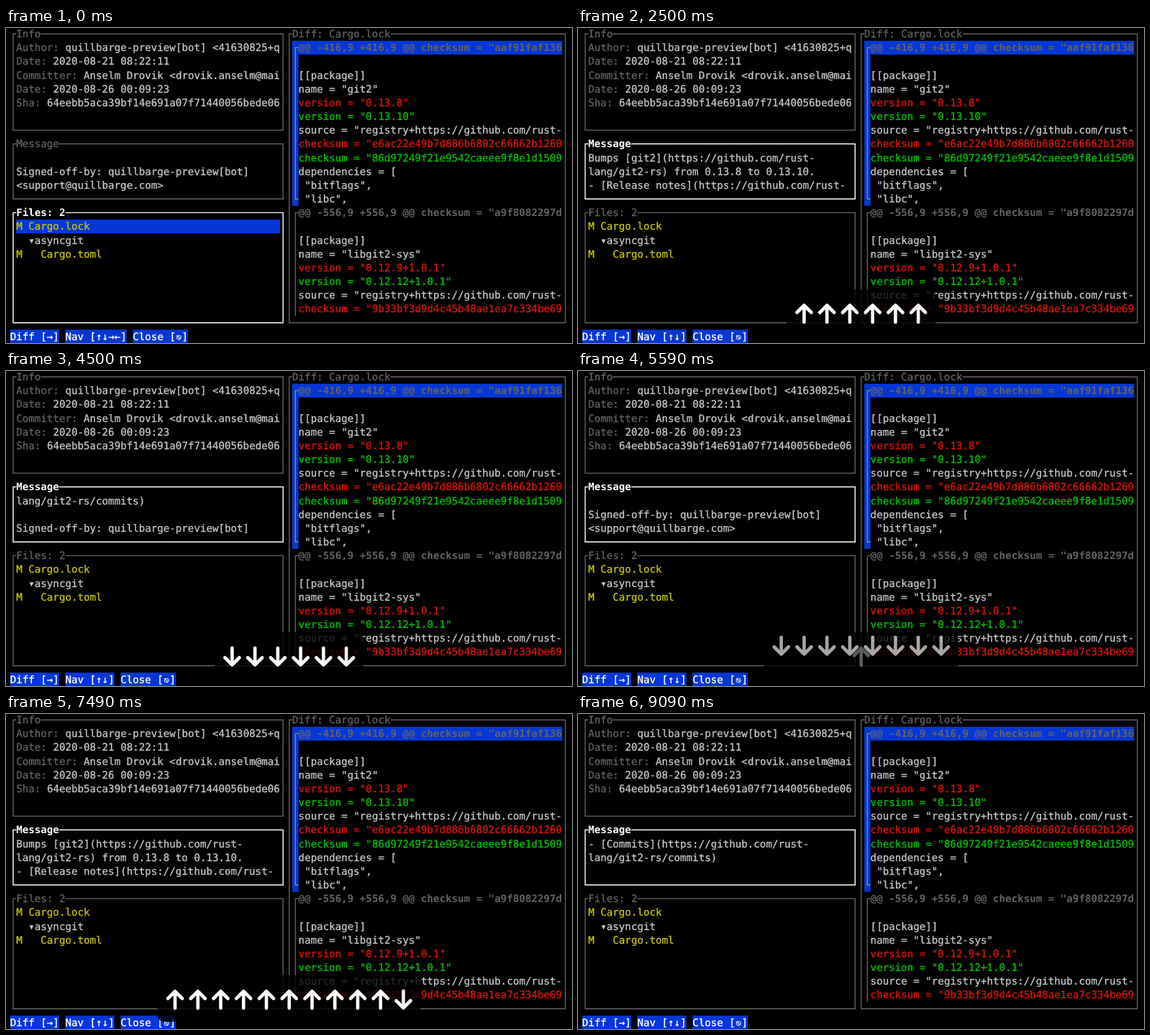
Write an HTML page that moves like this. It is 787 px wide and 439 px high and loops after 9190 ms.

```html
<!DOCTYPE html>
<html lang="en">
<head>
<meta charset="utf-8">
<title>Commit details</title>
<style>
html, body { margin: 0; width: 100%; height: 100%; overflow: hidden; background: #000; }
svg { display: block; width: 787px; height: 439px; }
text {
  font: 14.17px "DejaVu Sans Mono", monospace; white-space: pre;
  text-rendering: geometricPrecision;
  fill: currentColor; stroke: currentColor; stroke-width: .3;
}
.bold { font-weight: bold; stroke: none; }
</style>
</head>
<body>
<svg viewBox="0 0 787 439">
  <rect width="787" height="439"/>
  <g id="fixed"></g>
  <g id="live"></g>
  <g id="keys"></g>
</svg>
<script>
const LOOP = 9190, CELL = 8.53, ROW = 19.17;
const GREY = '#626262', LIGHT = '#c7c7c7', WHITE = '#fff', RED = '#dc1608',
      GREEN = '#00c400', YELLOW = '#c7c400', BLUE = '#0637d6';

const colX = c => 5.7 + c * CELL;
const rowY = r => 8.2 + r * ROW;
const escape = s => s.replace(/&/g, '&amp;').replace(/</g, '&lt;');

const text = (c, r, s, color = LIGHT, bold = false) =>
  `<text x="${colX(c)}" y="${rowY(r) + 4.8}" color="${color}"${bold ? ' class="bold"' : ''}>${escape(s)}</text>`;

const fillCells = (c, r, cols, rows = 1) =>
  `<rect x="${colX(c)}" y="${rowY(r) - ROW / 2}" width="${cols * CELL}" height="${rows * ROW}" fill="${BLUE}"/>`;

const line = (d, stroke) => `<path d="${d}" fill="none" stroke="${stroke}" stroke-width="1.4"/>`;

function panel(c1, r1, c2, r2, title, active) {
  const x1 = colX(c1 + .5), x2 = colX(c2 + .5), y1 = rowY(r1), y2 = rowY(r2);
  const color = active ? WHITE : GREY;
  return line(`M${colX(c1 + 1)} ${y1}H${x1}V${y2}H${x2}V${y1}H${colX(c1 + 1 + title.length)}`, color)
    + text(c1 + 1, r1, title, color, active);
}

// Diff lines start with -, + or a blank
function hunk(row, end, closed, header, lines) {
  const x = colX(46.5), edge = colX(47);
  const tail = closed ? `V${rowY(end)}H${edge}` : `V${rowY(end) + ROW / 2}`;
  const tint = { '-': RED, '+': GREEN, ' ': LIGHT };
  return line(`M${edge} ${rowY(row)}H${x}${tail}`, closed ? '#8a8a8a' : GREY)
    + text(47, row, header, GREY, true)
    + lines.map((s, i) => text(47, row + 1 + i, s.slice(1), tint[s[0]])).join('');
}

const info = [
  ['Author:', 'quillbarge-preview[bot] <41630825+q'],
  ['Date:', '2020-08-21 08:22:11'],
  ['Committer:', 'Anselm Drovik <drovik.anselm@mai'],
  ['Date:', '2020-08-26 00:09:23'],
  ['Sha:', '64eebb5aca39bf14e691a07f71440056bede06']
];

const message = [
  'Bumps [git2](https://github.com/rust-',
  'lang/git2-rs) from 0.13.8 to 0.13.10.',
  '- [Release notes](https://github.com/rust-',
  'lang/git2-rs/releases)',
  '- [Commits](https://github.com/rust-',
  'lang/git2-rs/commits)',
  '',
  'Signed-off-by: quillbarge-preview[bot]',
  '<support@quillbarge.com>'
];

const first = [
  ' ', ' [[package]]', ' name = "git2"', '-version = "0.13.8"', '+version = "0.13.10"',
  ' source = "registry+https://github.com/rust-',
  '-checksum = "e6ac22e49b7d886b6802c66662b1260',
  '+checksum = "86d97249f21e9542caeee9f8e1d1509',
  ' dependencies = [', '  "bitflags",', '  "libc",'
];

const second = [
  ' ', ' [[package]]', ' name = "libgit2-sys"', '-version = "0.12.9+1.0.1"', '+version = "0.12.12+1.0.1"',
  ' source = "registry+https://github.com/rust-',
  '-checksum = "9b33bf3d9d4c45b48ae1ea7c334be69'
];

// Runs of key presses: the first `ups` go up, the rest down
const runs = [
  { ups: 1, at: [700] },
  { ups: 8, at: [1400, 1800, 1900, 2000, 2100, 2400, 2700, 2800] },
  { ups: 0, at: [3700, 3900, 4000, 4200, 4300, 4400, 4590, 4790] },
  { ups: 10, at: [5590, 5990, 6190, 6290, 6490, 6690, 6790, 6990,
                  7090, 7290, 7390, 7590, 7690, 7790, 7990] }
];

const fixed = () =>
  panel(0, 0, 44, 7, 'Info', false)
  + info.map(([label, value], i) =>
      text(1, i + 1, label, GREY) + text(2 + label.length, i + 1, value)).join('')
  + panel(45, 0, 90, 21, 'Diff: Cargo.lock', false)
  + fillCells(46, 1, 44) + fillCells(46, 1, 1, 12)
  + hunk(1, 12, true, '@@ -416,9 +416,9 @@ checksum = "aaf91faf136', first)
  + hunk(13, 20, false, '@@ -556,9 +556,9 @@ checksum = "a9f8082297d', second);

function button(c, label) {
  return fillCells(c, 22, label.length) + text(c, 22, label, WHITE);
}

function live(inMessage, scroll) {
  const nav = inMessage ? 'Nav [↑↓]' : 'Nav [↑↓→←]';
  const close = 10 + nav.length;
  return panel(0, 8, 44, 12, 'Message', inMessage)
    + message.slice(scroll, scroll + 3).map((s, i) => text(1, 9 + i, s)).join('')
    + panel(0, 13, 44, 21, 'Files: 2', !inMessage)
    + (inMessage ? '' : fillCells(1, 14, 43))
    + text(1, 14, 'M Cargo.lock', YELLOW)
    + text(3, 15, '▾asyncgit')
    + text(1, 16, 'M   Cargo.toml', YELLOW)
    + button(0, 'Diff [→]') + button(9, nav) + button(close, 'Close [ ]')
    + `<text x="${colX(close + 7.5)}" y="${rowY(22) + 4.8}" color="${WHITE}" text-anchor="middle" style="font-size:12px">⎋</text>`;
}

function arrow(i, count, up, dy, opacity) {
  const x = 393.8 + (i - (count - 1) / 2) * 31.75;
  return `<path transform="translate(${x} ${398 + dy}) scale(1 ${up ? 1 : -1})" opacity="${opacity}"
    d="M0 12V-11M-10 -1.5L0 -11.5L10 -1.5" fill="none" stroke="#fff" stroke-width="4.6"
    stroke-linecap="round" stroke-linejoin="round"/>`;
}

function keys(t) {
  const index = runs.findLastIndex(run => run.at[0] <= t);
  if (index < 0 || t >= 9090) return '';
  const { ups, at } = runs[index], old = runs[index - 1];
  const count = at.filter(k => k <= t).length;
  const age = t - at[count - 1];
  const replacing = count === 1 && old && age < 90;
  const wide = replacing ? Math.max(count, old.at.length) : count;
  const half = wide * 15.875 + 8.2;
  const fresh = age < 90 ? (replacing ? .35 : .6) : age < 180 ? .95 : 1;
  let out = `<rect x="${393.5 - half}" y="364" width="${2 * half}" height="65" rx="9" opacity=".8"/>`;
  if (replacing) {
    old.at.forEach((k, i) => out += arrow(i, old.at.length, i < old.ups, -15, .65));
  }
  for (let i = 0; i < count; i++) {
    out += arrow(i, count, i < ups, 0, i === count - 1 ? fresh : 1);
  }
  const fade = t < 8890 ? 1 : t < 8990 ? .6 : .25;
  return `<g opacity="${fade}">${out}</g>`;
}

// The first press after a change of direction does not scroll
function scrollAt(t) {
  let pos = 6, last = 1;
  for (const { ups, at } of runs) at.forEach((k, i) => {
    if (k > t) return;
    const dir = i < ups ? -1 : 1;
    if (dir === last) pos = Math.min(6, Math.max(0, pos + dir));
    last = dir;
  });
  return pos;
}

const shown = {};
function show(id, markup) {
  if (shown[id] === markup) return;
  shown[id] = markup;
  document.getElementById(id).innerHTML = markup;
}

function render(t) {
  const inMessage = t >= 700 && t < 4790 || t >= 5590;
  show('live', live(inMessage, scrollAt(t)));
  show('keys', keys(t));
}

show('fixed', fixed());
render(0);
const start = performance.now();
requestAnimationFrame(function tick() {
  render((performance.now() - start) % LOOP);
  requestAnimationFrame(tick);
});
</script>
</body>
</html>
```
